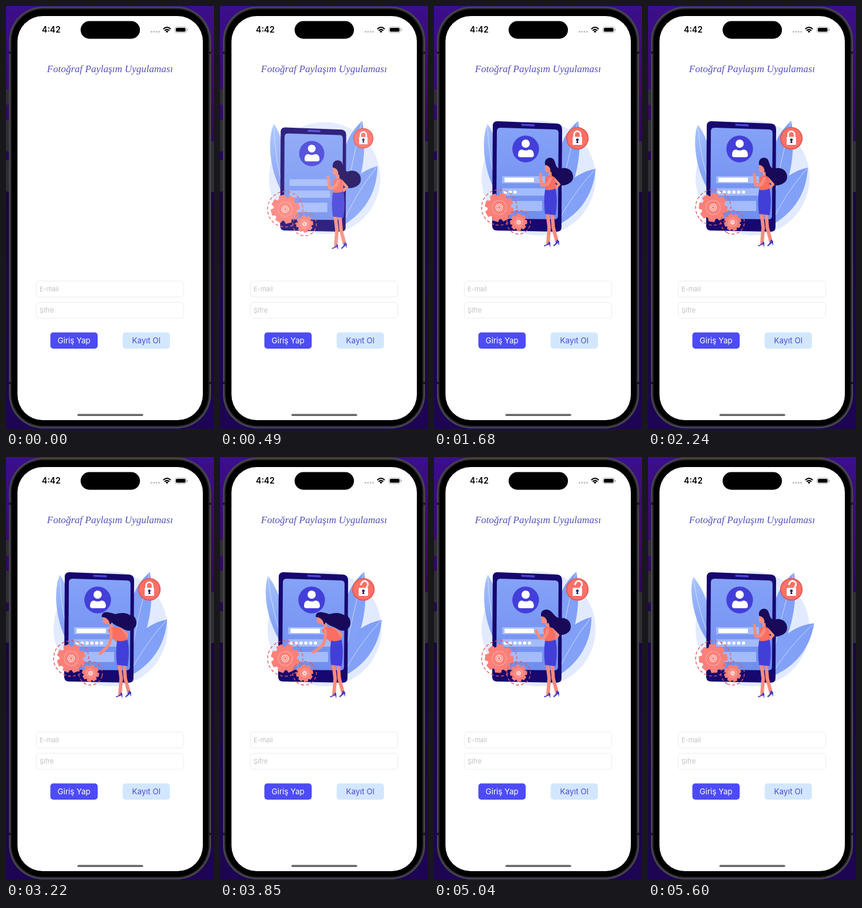
These frames come from a looping animation (354 px wide and 716 px high, 5670 ms). An HTML page:

```html
<!DOCTYPE html>
<html lang="tr">
<head>
<meta charset="utf-8">
<style>
  html, body { margin: 0; width: 100%; height: 100%; overflow: hidden; background: #1b0546; }
  svg { display: block; width: 354px; height: 716px; font-family: Inter, sans-serif; }
  .title { font: italic 17px "Liberation Serif", serif; fill: #5350b8; }
  .hint { font-size: 11px; fill: #c1c1c5; }
  .button { font-size: 13.3px; text-anchor: middle; }
  .rib { fill: none; stroke: #dbe6ff; stroke-width: .8; }
  .skin { fill: none; stroke: #fb8b7d; stroke-linecap: round; stroke-linejoin: round; }
  .ring { fill: none; stroke: #df5964; stroke-width: 1.4; stroke-dasharray: 5 3.6; }
  .hub { fill: none; stroke: #fff; stroke-width: 1; }
</style>
</head>
<body>
<svg viewBox="0 0 354 716">
  <defs>
    <linearGradient id="wall" x1="0" y1="0" x2="0" y2="1">
      <stop offset="0" stop-color="#3b0e8c"/><stop offset=".2" stop-color="#3a0a68"/>
      <stop offset=".45" stop-color="#1a0540"/><stop offset="1" stop-color="#1d0554"/>
    </linearGradient>
    <linearGradient id="leafFill" x1="0" y1="0" x2="0" y2="1">
      <stop offset="0" stop-color="#a6c2fd"/><stop offset="1" stop-color="#7795f2"/>
    </linearGradient>
    <linearGradient id="leafDeep" x1="0" y1="0" x2="0" y2="1">
      <stop offset="0" stop-color="#7f9ff6"/><stop offset="1" stop-color="#84a2f8"/>
    </linearGradient>
    <linearGradient id="glass" x1="0" y1="0" x2="0" y2="1">
      <stop offset="0" stop-color="#85a2f8"/><stop offset="1" stop-color="#6f8eee"/>
    </linearGradient>
  </defs>

  <!-- device -->
  <rect width="354" height="716" fill="url(#wall)"/>
  <path d="M2.5 141V167M2.5 193V246M2.5 261V314M351.5 229V315" stroke="#2f2f33" stroke-width="5"/>
  <rect x="5" y="1" width="344" height="714" rx="58" fill="#47474b"/>
  <rect x="7.5" y="3.5" width="339" height="709" rx="56" fill="#242427"/>
  <rect x="9.5" y="5.5" width="335" height="705" rx="54"/>
  <path d="M5 79H9M345 79H349M5 638H9M345 638H349" stroke="#19191b" stroke-width="4"/>
  <rect x="19.5" y="17" width="315.5" height="684" rx="43" fill="#fff"/>
  <rect x="127" y="25.5" width="101" height="30" rx="15"/>
  <text x="77" y="45" font-size="14" font-weight="600" text-anchor="middle">4:42</text>
  <path d="M247.5 43.5H261" stroke="#bcbcbf" stroke-width="3" stroke-linecap="round" stroke-dasharray="0 4.3"/>
  <g fill="none" stroke="#000" stroke-width="2">
    <path d="M267.7 39Q274 33 280.3 39M270 41.7Q274 37.7 278 41.7"/>
    <path d="M271.7 42.7Q274 41 276.3 42.7L274 45.5Z" fill="#000" stroke="none"/>
  </g>
  <rect x="287.5" y="35.5" width="19.5" height="9.5" rx="3" fill="none" stroke="#aaa"/>
  <rect x="289" y="37" width="16.5" height="6.5" rx="1.8"/>
  <path d="M308.7 38.7V42" stroke="#aaa" stroke-width="1.4"/>
  <rect x="121.5" y="690.5" width="112" height="3.6" rx="1.8" fill="#666668"/>

  <!-- form -->
  <text class="title" x="177" y="112" text-anchor="middle">Fotoğraf Paylaşım Uygulaması</text>
  <g fill="#fff" stroke="#ededee">
    <rect x="51.5" y="465.5" width="251" height="27" rx="5"/>
    <rect x="51.5" y="501.5" width="251" height="27" rx="5"/>
  </g>
  <text class="hint" x="57" y="483">E-mail</text>
  <text class="hint" x="57" y="519">Şifre</text>
  <rect x="75.5" y="552.5" width="80.5" height="27.5" rx="5" fill="#4c4bf7"/>
  <text class="button" x="115.8" y="571" fill="#fff">Giriş Yap</text>
  <rect x="198.5" y="552.5" width="80.5" height="27.5" rx="5" fill="#d2e7ff"/>
  <text class="button" x="238.7" y="571" fill="#4d4bd0">Kayıt Ol</text>

  <!-- illustration -->
  <g id="art">
    <circle id="backdrop" cx="178" cy="291" r="97" fill="#e2eaff"/>
    <g id="leafLeft">
      <path d="M85 201C75 225 80 285 112 325C115 280 108 230 85 201" fill="url(#leafFill)"/>
      <path class="rib" d="M85 203Q90 265 112 325"/>
    </g>
    <g id="leafTop">
      <path d="M246 195C205 230 205 280 211 345C250 300 252 230 246 195" fill="url(#leafDeep)"/>
      <path class="rib" d="M245 198Q226 265 211 345"/>
    </g>
    <g id="leafRight">
      <path d="M277 277C230 285 205 320 207 373C245 355 272 325 277 277" fill="url(#leafDeep)"/>
      <path class="rib" d="M275 279Q235 320 207 373"/>
    </g>

    <g id="phone">
      <path d="M108 195L210 199Q218 200 218 209L217 374Q217 382 209 382L106 380Q99 379 99 372L100 203Q100 195 108 195Z" fill="#17086f"/>
      <path d="M113 206L206 209Q212 209 212 215L211 356Q211 361 205 361L112 360Q106 360 106 354L107 212Q107 206 113 206Z" fill="url(#glass)"/>
      <path d="M150 201L170 202" stroke="#4a46d8" stroke-width="3.4" stroke-linecap="round"/>
      <circle cx="156" cy="242" r="22.7" fill="#433fd9"/>
      <circle cx="156" cy="233" r="7" fill="#fff"/>
      <path d="M143 252Q143 243 150 243Q156 246 162 243Q170 243 170 252Q170 256 166 256H147Q143 256 143 252Z" fill="#fff"/>
      <path d="M116 288H189V300H116ZM116 308.5H189V321H116ZM115 330H184V347H115Z" fill="#a4bbfb"/>
      <rect id="mail" x="120" y="290.5" height="7.5" fill="#fff"/>
      <g id="dots" fill="#fff"></g>
    </g>

    <g id="gears">
      <g id="bigGear"></g>
      <g id="smallGear"></g>
    </g>

    <g id="lock">
      <circle cx="244" cy="224" r="18.3" fill="#fb7067" stroke="#e3544f" stroke-width="1.6"/>
      <path id="shackle" d="M238.5 222V217.5A5.5 5.5 0 0 1 249.5 217.5V222" fill="none" stroke="#fff" stroke-width="2.7"/>
      <rect x="236" y="221.5" width="16" height="13.5" rx="1" fill="#fff"/>
      <circle cx="244" cy="226.5" r="2.3" fill="#2b2360"/>
      <path d="M244 226L246 232H242Z" fill="#2b2360"/>
    </g>

    <g id="woman">
      <path id="hair" fill="#180a59"/>
      <path class="skin" d="M193 350L196 375L194 402" stroke-width="6"/>
      <path class="skin" d="M201 350L203 375L209 398" stroke-width="6"/>
      <path d="M187 405Q194 404 196 398L198 401V409L196 403L188 407ZM203 405Q208 402 209 395L213 398V406L211 401L204 407Z" fill="#3d3acb"/>
      <path id="backArm" class="skin" stroke-width="4.5"/>
      <path id="neck" class="skin" stroke-width="5"/>
      <path id="torso" fill="#fb6e62"/>
      <path d="M189 311Q198 313 207 309Q211 330 207 354L189 352Q186 330 189 311Z" fill="#423fd8"/>
      <path id="face" fill="#fb8b7d"/>
      <path id="fringe" fill="#180a59"/>
      <path id="frontArm" class="skin" stroke-width="5"/>
    </g>
  </g>
</svg>

<script>
const LOOP = 5670, STEP = 70, SWAY = 1517;
const el = id => document.getElementById(id);
const set = (id, attrs) => { for (const k in attrs) el(id).setAttribute(k, attrs[k]); };
const clamp = x => Math.min(1, Math.max(0, x));
const ease = (t, from, to) => { const p = clamp((t - from) / (to - from)); return p * p * (3 - 2 * p); };

// Blends two paths of equal structure
const mix = (a, b, p) => {
  const end = b.match(/[\d.]+/g);
  let i = 0;
  return a.replace(/[\d.]+/g, n => (+n + (end[i++] - n) * p).toFixed(2));
};
const scaleAt = (x, y, s) => `translate(${x} ${y}) scale(${s}) translate(${-x} ${-y})`;

// Upright and bent pose of each moving part
const poses = {
  hair: ["M189 268C187 258 198 253 204 260C208 268 206 272 214 276C228 270 240 281 236 294C231 304 214 307 204 300C198 292 202 282 197 266Z",
         "M164 269C162 262 174 261 186 266C196 263 204 263 212 268C220 267 224 279 221 286C217 294 208 297 198 290C190 285 182 287 174 270Z"],
  fringe: ["M189 269C188 256 202 254 205 263C206 272 202 279 198 282C199 275 196 270 189 269Z",
           "M163 271C162 260 178 260 181 269C182 277 180 281 177 284C176 277 172 271 163 271Z"],
  face: ["M190 267Q188 272 189 278Q190 282 195 281Q200 278 199 269Z",
         "M165 269Q164 273 165 279Q168 283 173 282Q178 278 176 270Z"],
  neck: ["M197 276L198 288", "M174 278L182 290"],
  torso: ["M190 290Q198 284 205 290Q208 300 207 311L189 312Q191 300 190 290Z",
          "M173 293Q180 285 193 289Q204 298 207 311L189 314Q180 306 173 293Z"],
  backArm: ["M204 292L213 302L206 309", "M194 291L206 300L203 309"]
};
const arms = ["M198 292Q194 306 183 303L181 285", "M179 293Q180 310 174 320L160 333", "M180 294Q183 312 174 318L154 322"];

function buildGear(id, r) {
  const points = [];
  for (let i = 0; i < 8; i++)
    for (const [shift, k] of [[-.3, .8], [-.19, 1], [.19, 1], [.3, .8]]) {
      const a = i * Math.PI / 4 + shift;
      points.push([r * k * Math.cos(a), r * k * Math.sin(a)].map(v => v.toFixed(2)));
    }
  el(id).innerHTML = `<circle class="ring" r="${r + 6}"/>
    <polygon points="${points.join(" ")}" fill="#fb8079" stroke="#fb8079" stroke-width="1.5" stroke-linejoin="round"/>
    <circle class="hub" r="${r * .5}" opacity=".35"/><circle class="hub" r="${r * .24}"/><circle class="hub" r="${r * .12}"/>`;
}
buildGear("bigGear", 24);
buildGear("smallGear", 14);
for (let i = 0; i < 6; i++) el("dots").innerHTML += `<circle cx="${121.5 + i * 8.2}" cy="315" r="2.8"/>`;

function draw(t) {
  const away = (1 - clamp((t - 70) / 630)) ** 2;
  set("art", { opacity: 1 - away });
  set("backdrop", { transform: scaleAt(178, 310, 1 - away * .2) });
  set("phone", { transform: scaleAt(159, 382, 1 - away * .5) });
  set("lock", { transform: scaleAt(244, 224, 1 - away * .9) });
  set("gears", { transform: `translate(0 ${away * 27})` });
  set("woman", { transform: `translate(${away * 27} ${away * 41})` });

  const sway = (id, degrees, phase, x, y) => set(id, {
    transform: `rotate(${degrees * Math.cos((t / SWAY * 360 - phase) * Math.PI / 180)} ${x} ${y})`
  });
  sway("leafLeft", -3.8, 260, 112, 325);
  sway("leafTop", 1.5, 296, 211, 345);
  sway("leafRight", 5.2, 296, 207, 373);

  const turn = t / LOOP * 360;
  set("bigGear", { transform: `translate(111 341) rotate(${turn})` });
  set("smallGear", { transform: `translate(144 366) rotate(${-turn * 1.7})` });

  set("mail", { width: 50 * clamp((t - 700) / 460) });
  [...el("dots").children].forEach((dot, i) => dot.setAttribute("opacity", +(t >= 1330 + i * 120)));
  set("shackle", { transform: `rotate(${28 * ease(t, 3500, 3900)} 249.5 221)` });

  const lean = ease(t, 2520, 3080) - ease(t, 4620, 5250);
  for (const id in poses) set(id, { d: mix(...poses[id], lean) });
  const reach = mix(arms[1], arms[2], ease(t, 3640, 4340));
  set("frontArm", { d: mix(arms[0], reach, lean) });
}

const start = performance.now();
function tick() {
  const t = (performance.now() - start) % LOOP;
  draw(Math.floor(t / STEP) * STEP);
  requestAnimationFrame(tick);
}
tick();
</script>
</body>
</html>
```
